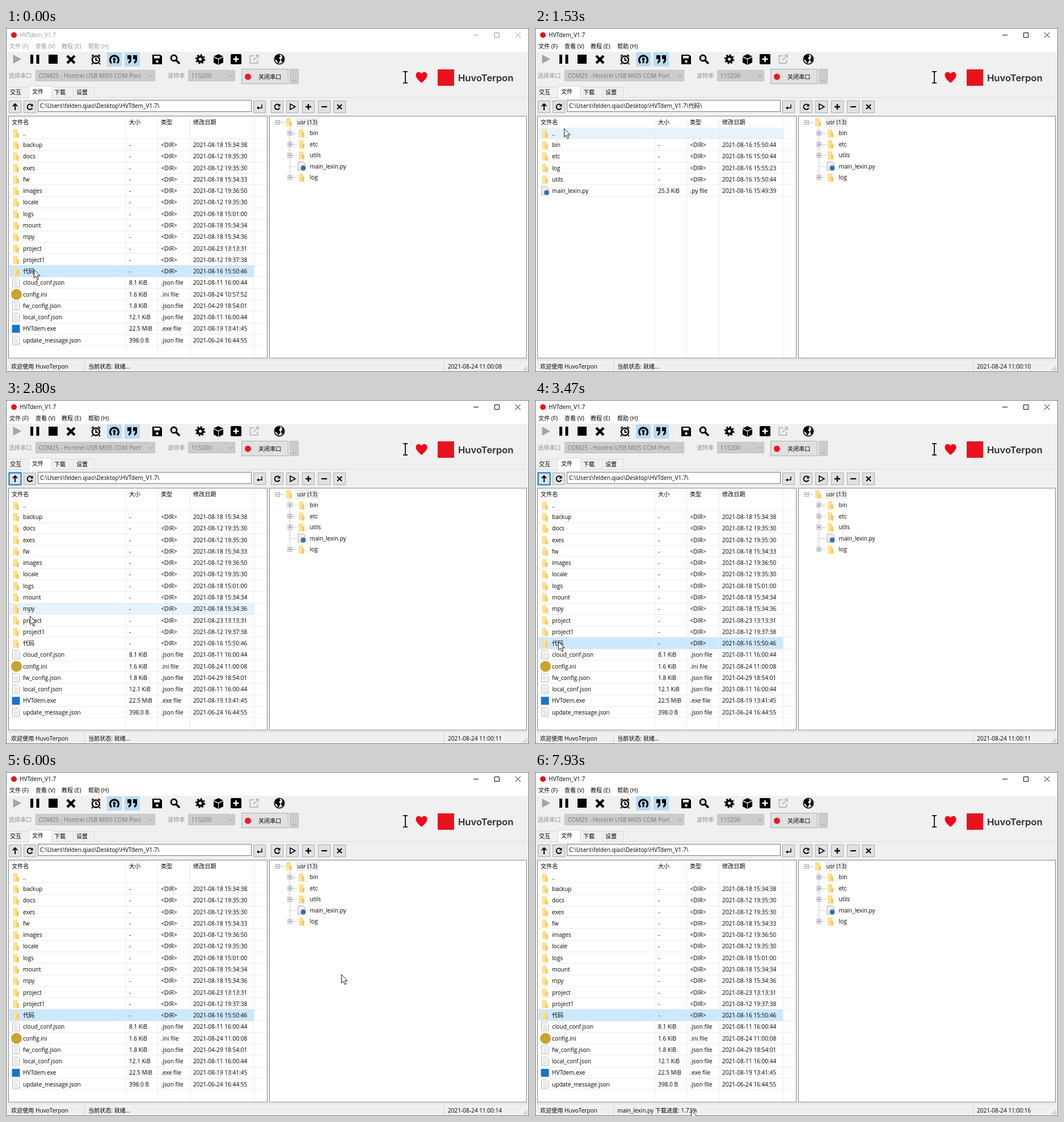
Animation, 922 px wide and 607 px high, one loop 8 s. Source, as an HTML page:

```html
<!DOCTYPE html>
<html lang="zh">
<head>
<meta charset="utf-8">
<style>
html, body { margin: 0; width: 100%; height: 100%; overflow: hidden; background: #f0f0f0; }
svg { display: block; width: 922px; height: 607px; }
text { font: 10.1px "Open Sans", "Noto Sans CJK SC", "Noto Sans CJK", sans-serif; fill: #000; }
.dim text { fill: #999; }
.dim path { stroke: #999; }
</style>
</head>
<body>
<svg id="stage" viewBox="0 0 922 607"></svg>
<script>
const LOOP = 8000, ROW = 20.28, LIST_TOP = 175.5;
const HOME = 'C:\\Users\\felden.qiao\\Desktop\\HVTdem_V1.7\\';

// Markup helpers; text is placed by its vertical centre
const esc = s => s.replace(/&/g, '&amp;').replace(/</g, '&lt;').replace(/>/g, '&gt;');
const text = (x, y, s, attr = '') => `<text x="${x}" y="${y + 3.7}" ${attr}>${esc(s)}</text>`;
const rect = (x, y, w, h, fill, attr = '') =>
  `<rect x="${x}" y="${y}" width="${w}" height="${h}" fill="${fill}" ${attr}/>`;
const box = (x, y, w, h, fill, stroke, attr = '') =>
  rect(x + .5, y + .5, w - 1, h - 1, fill, `stroke="${stroke}" ${attr}`);
const path = (d, attr = '') => `<path d="${d}" ${attr}/>`;
const line = (d, stroke = '#000', width = 1, attr = '') =>
  path(d, `fill="none" stroke="${stroke}" stroke-width="${width}" ${attr}`);
const dot = (x, y, r, fill, attr = '') => `<circle cx="${x}" cy="${y}" r="${r}" fill="${fill}" ${attr}/>`;
const at = (x, y, body, attr = '') => `<g transform="translate(${x} ${y})" ${attr}>${body}</g>`;

const icons = {
  folder: path('M-5 -7H2.5V-1H5V7.5H-5Z', 'fill="#ffe093"') + path('M2.5 -7V-1H5V7.5H1V0Z', 'fill="#f5cb63"'),
  file: path('M-6 -7.5H3L6 -4.5V7H-6Z', 'fill="#fff" stroke="#a6a6a6" stroke-width=".9"') +
    line('M-3.5 -3.5H2M-3.5 -1H3.5M-3.5 1.5H3.5M-3.5 4H3.5', '#bcbcbc', .8),
  script: path('M-6 -8H3L6 -5V7H-6Z', 'fill="#eee" stroke="#a6a6a6" stroke-width=".9"') + dot(3, 3, 4.5, '#3973a6'),
  config: dot(1, 0, 9.5, '#c7a42d'),
  exe: rect(-7, -7, 14, 14, '#1674cd')
};

function toolbar() {
  const black = [
    line('M45.5 47V63M56 47V63', '#000', 5),
    rect(75, 47, 16, 16, '#000'),
    line('M108 49L121 62M121 49L108 62', '#000', 4.5),
    dot(158.5, 56, 6.5, 'none', 'stroke="#000" stroke-width="2.5"') +
      line('M158.5 52V57H162M151 50L154.5 47M166 50L162.5 47M153 62L151 64M164 62L166 64', '#000', 2),
    rect(178, 43, 26, 25, '#b8daf3') + line('M186 62A7.5 7.5 0 1 1 196 62', '#000', 3.2) +
      dot(191, 55, 2.5, '#000') + line('M191 55V62', '#000', 3),
    rect(209, 43, 27, 25, '#b8daf3') +
      path('M214 48H221V56Q221 61 216 63V59Q218 58 218 55H214ZM224 48H231V56Q231 61 226 63V59Q228 58 228 55H224Z'),
    path('M258 47H272L275 50V64H258Z') + rect(261, 49, 10, 4.5, '#f0f0f0') + dot(266.5, 59, 2.3, '#f0f0f0'),
    dot(296, 53, 5, 'none', 'stroke="#000" stroke-width="2.8"') + line('M300 57L306 63', '#000', 3.5),
    dot(342.5, 55, 4.6, 'none', 'stroke="#000" stroke-width="4"') +
      dot(342.5, 55, 7.6, 'none', 'stroke="#000" stroke-width="2.4" stroke-dasharray="3 2.97"'),
    path('M374.5 46L383 50L374.5 54L366 50ZM366 51.5L374 55.5V65L366 61ZM383 51.5L375 55.5V65L383 61Z'),
    rect(396, 46, 19, 18, '#000', 'rx="2"') + line('M405.5 50V60M400.5 55H410.5', '#fff', 2.5),
    dot(482, 55, 8.7, '#f0f0f0', 'stroke="#000" stroke-width="1.6"') +
      path('M474 52L477 48L482 47L484 50L481 53L484 56L482 60L480 63L478 58L474 55ZM486 48L490 53L489 59L486 60L485 55L487 53Z')
  ];
  return black.join('') + path('M12.5 47L27 55L12.5 63Z', 'fill="#a5a5a5"') +
    line('M437 49H430.5V62H443.5V56M440 48H445V53M445 48L436 57', '#bcbcbc', 2);
}

function portBar() {
  const combo = (x, w, label) => box(x, 74, w, 20, '#ccc', '#bfbfbf') +
    text(x + 5.5, 84, label, 'style="fill:#777;font-size:10.4px"') +
    line(`M${x + w - 11} 82.5l3.5 3.5l3.5 -3.5`, '#8a8a8a');
  return text(5, 84, '选择串口', 'style="fill:#909090"') + combo(52, 211, 'COM25 - Hontrel USB MI05 COM Port') +
    text(285, 84, '波特率', 'style="fill:#909090"') + combo(321, 83, '115200') +
    box(415, 72, 83, 27, '#e1e1e1', '#adadad') + dot(426.5, 86, 5.5, '#ee1620') + text(445, 86, '关闭串口') +
    box(500, 72, 16, 27, '#ccc', '#bfbfbf') + text(504, 90, '...', 'style="fill:#777"') +
    line('M700 77H708M704 77V97M700 97H708', '#222', 2) +
    path('M732.5 97C727 92 722.5 88 722.5 83.5C722.5 77 730 76 732.5 81C735 76 742.5 77 742.5 83.5C742.5 88 738 92 732.5 97Z', 'fill="#f50018"') +
    rect(761, 73, 29, 29, '#e8121f') +
    text(797, 89.8, 'HuvoTerpon', 'style="font:600 16.6px Inter,sans-serif;fill:#2b2b2b"');
}

function tabs() {
  const idle = (x, w, label, tx) => box(x, 104, w, 19, '#f0f0f0', '#d9d9d9') + text(tx, 113, label);
  return idle(0, 41, '交互', 7) + idle(80, 39, '下载', 85) + idle(118, 38, '设置', 124) +
    line('M0 122.5H922', '#dcdcdc') + box(40, 102, 41, 22, '#fff', '#d9d9d9') +
    rect(41, 122, 39, 2, '#fff') + text(46, 112, '文件');
}

const reload = line('M4 -2.5A4.6 4.6 0 1 0 4.4 2', '#000', 2) + path('M5.5 -5.5V-.5H.5Z');
const button = (x, icon) => box(x, 128, 22, 22, '#e1e1e1', '#adadad') + at(x + 11, 139, icon);

function panels() {
  const plus = 'M0 -5V5M-5 0H5';
  return button(31, reload) + box(56, 127, 377, 21, '#fff', '#7a7a7a') +
    button(436, line('M4 -4V2H-3', '#000', 1.5) + path('M-5 2L-1.5 -1V5Z')) +
    button(467, reload) + button(494, line('M-4 -5L5 0L-4 5Z', '#000', 1.6)) +
    button(522, line(plus, '#000', 2.4)) + button(550, line('M-5 0H5', '#000', 2.2)) +
    button(577, line('M-4 -4L4 4M4 -4L-4 4', '#000', 2)) +
    box(4, 155, 457, 428, '#fff', '#828790') + box(464, 155, 454, 428, '#fff', '#828790');
}

function tree() {
  const expander = (x, y, open) => box(x, y - 4, 8, 8, '#fff', '#9a9a9a') +
    line(`M${x + 2} ${y}h4` + (open ? '' : `M${x + 4} ${y - 2}v4`), '#33508c', .9);
  const dots = d => line(d, '#999', 1, 'stroke-dasharray="1 1"');
  let out = dots('M484 166.5H491M500.5 175V263') + expander(475, 166.5, true) + at(499, 166, icons.folder) +
    rect(511, 158, 41, 17, '#f0f0f0') + text(513.5, 166, 'usr (13)');
  ['bin', 'etc', 'utils', 'main_lexin.py', 'log'].forEach((name, i) => {
    const y = 185.5 + 19.5 * i, script = name.endsWith('.py');
    out += dots(`M501 ${Math.floor(y) + .5}H512`) + (script ? '' : expander(496.5, y, false)) +
      at(521, y, script ? icons.script : icons.folder) + text(535.5, y, name);
  });
  return out;
}

// Each entry: name, date, size
const rootRows = `..
backup|08-18 15:34:38
docs|08-12 19:35:30
exes|08-12 19:35:30
fw|08-18 15:34:33
images|08-12 19:36:50
locale|08-12 19:35:30
logs|08-18 15:01:00
mount|08-18 15:34:34
mpy|08-18 15:34:36
project|08-23 13:13:31
project1|08-12 19:37:38
代码|08-16 15:50:46
cloud_conf.json|08-11 16:00:44|8.1 KiB
config.ini|08-24 10:57:52|1.6 KiB
fw_config.json|04-29 18:54:01|1.8 KiB
local_conf.json|08-11 16:00:44|12.1 KiB
HVTdem.exe|08-19 13:41:45|22.5 MiB
update_message.json|06-24 16:44:55|398.0 B`.split('\n');
const codeRows = `..
bin|08-16 15:50:44
etc|08-16 15:50:44
log|08-16 15:55:23
utils|08-16 15:50:44
main_lexin.py|08-16 15:49:39|25.3 KiB`.split('\n');
const iconOf = { json: 'file', ini: 'config', exe: 'exe', py: 'script' };

function rows(list) {
  return list.map((entry, i) => {
    const [name, date, size] = entry.split('|'), y = 186 + ROW * i;
    const ext = size && name.split('.').pop();
    const lineY = Math.floor(LIST_TOP + ROW * (i + 1)) + .5;
    return line(`M5 ${lineY}H460`, '#ededed') + at(17.5, y, icons[ext ? iconOf[ext] : 'folder']) +
      text(30, y, name) + (date ? text(217, y, size || '-') +
      text(273.5, y, ext ? `.${ext} file` : '<DIR>') +
      text(330, y, '2021-' + date, name === 'config.ini' ? 'id="configDate"' : '') : '');
  }).join('');
}

const chrome = rect(0, 0, 922, 42, '#fff') + dot(14, 12.5, 5, '#e8121f') +
  `<g id="caption">${text(24, 12.5, 'HVTdem_V1.7')}${
    [[6, '文件 (F)'], [52, '查看 (V)'], [98, '教程 (E)'], [145, '帮助 (H)']].map(([x, s]) => text(x, 32.5, s)).join('')}${
    line('M824 12.5H833M861.5 8.5H869.5V16.5H861.5ZM898 8L907 17M907 8L898 17')}</g>`;

const statusBar = line('M0 585.5H922', '#d7d7d7') + line('M138.5 588V606M772.5 588V606', '#d0d0d0') +
  text(9, 597, '欢迎使用 HuvoTerpon') + text(145, 597, '', 'id="status"') + text(779, 597, '', 'id="clock"') +
  line('M911 603.5h2m1 0h2m1 0h2M914 600.5h2m1 0h2M917 597.5h2', '#bfbfbf', 2);

const stage = document.getElementById('stage');
stage.innerHTML = rect(0, 0, 922, 607, '#f0f0f0') + chrome + toolbar() + portBar() + tabs() + panels() +
  `<g id="upButton">${button(5, line('M0 6V-4M-4 -1L0 -5L4 -1', '#000', 2))}</g>` +
  text(60, 137, '', 'id="address"') +
  rect(6, 0, 431, 20, '#e5f3ff', 'id="hover"') +
  rect(6, 419, 431, 20, '#cce8ff', 'id="selected"') +
  line('M211.5 156V582M267.5 156V582M324.5 156V582M437.5 156V582', '#ebebeb') +
  text(10, 166, '文件名') + text(217, 166, '大小') + text(273, 166, '类型') + text(330, 166, '修改日期') +
  `<g id="rootList">${rows(rootRows)}</g><g id="codeList">${rows(codeRows)}</g>` +
  tree() + statusBar + rect(.5, .5, 921, 606, 'none', 'stroke="#777"') +
  `<g id="pointer">
    <path id="arrow" d="M.5 .5V15.2L3.8 12.1L6.2 18L8.6 17L6.3 11.3H11Z" fill="#fff" stroke="#000" stroke-width=".9"/>
    <g id="denied">${dot(0, 0, 6.3, '#fff', 'stroke="#fff" stroke-width="4"')}${
      dot(0, 0, 6, 'none', 'stroke="#000" stroke-width="2"')}${line('M-4 -4L4 4', '#000', 2)}</g>
  </g>`;

const el = {};
stage.querySelectorAll('[id]').forEach(node => el[node.id] = node);
const upFace = el.upButton.querySelector('rect');

// Pointer track: time, x, y
const track = [
  [0, 49, 426], [670, 49, 426], [800, 66, 300], [930, 75, 219], [1200, 77, 200], [1470, 58, 184],
  [1800, 20, 144], [1930, 16, 140], [2200, 16, 140], [2500, 30, 250], [2800, 42, 381], [2930, 42, 386],
  [3130, 41, 426], [3670, 41, 426], [3870, 38, 427], [4200, 38, 427], [4400, 165, 408], [4600, 359, 384],
  [4930, 591, 357], [6800, 591, 357], [7150, 430, 430], [7600, 300, 528], [7930, 275, 597], [8000, 275, 597]
];
const ticks = [470, 1530, 2530, 3530, 4530, 5470, 6530, 7530];

function pointerAt(t) {
  const i = Math.max(1, track.findIndex(p => p[0] > t));
  const [t0, x0, y0] = track[i - 1], [t1, x1, y1] = track[i];
  const k = Math.max(0, (t - t0) / (t1 - t0));
  return [x0 + (x1 - x0) * k, y0 + (y1 - y0) * k];
}

const within = (t, a, b) => t >= a && t < b;
const show = (node, on) => node.style.display = on ? '' : 'none';
const setText = (node, s) => { if (node.textContent !== s) node.textContent = s; };

function render(t) {
  const inCode = within(t, 330, 2070), dragging = within(t, 4200, 5070);
  const [x, y] = pointerAt(t);

  el.caption.setAttribute('class', t < 70 ? 'dim' : '');
  show(el.rootList, !inCode);
  show(el.codeList, inCode);
  setText(el.address, HOME + (inCode ? '代码\\' : ''));
  setText(el.configDate, t < 330 ? '2021-08-24 10:57:52' : '2021-08-24 11:00:08');
  show(el.selected, t < 330 || t >= 3470);

  // Row highlight trails the pointer slightly
  const [hx, hy] = pointerAt(Math.max(0, t - 16));
  const row = Math.floor((hy - LIST_TOP) / ROW);
  const count = (inCode ? codeRows : rootRows).length;
  show(el.hover, !dragging && hx < 437 && row >= 0 && row < count);
  el.hover.setAttribute('y', Math.round(LIST_TOP + ROW * row));

  const over = x >= 5 && x < 27 && y >= 128 && y < 150;
  const pressed = within(t, 1930, 2070), focused = within(t, 1930, 3670);
  upFace.setAttribute('fill', pressed ? '#cce4f7' : over ? '#e5f1fb' : '#e1e1e1');
  upFace.setAttribute('stroke', over || focused ? '#0078d7' : '#adadad');
  upFace.setAttribute('stroke-width', focused && !over ? 2 : 1);

  const second = 8 + ticks.filter(k => t >= k).length;
  setText(el.clock, '2021-08-24 11:00:' + String(second).padStart(2, '0'));
  setText(el.status, t < 6530 ? '当前状态: 就绪...' : `main_lexin.py 下载进度: ${t < 7200 ? '0.87' : '1.73'}%`);

  const denied = dragging && x < 464;
  show(el.pointer, !within(t, 5070, 6000));
  show(el.arrow, !denied);
  show(el.denied, denied);
  el.pointer.setAttribute('transform', `translate(${Math.round(x)} ${Math.round(y)})`);
}

const start = performance.now();
function frame() {
  render((performance.now() - start) % LOOP);
  requestAnimationFrame(frame);
}
frame();
</script>
</body>
</html>
```
